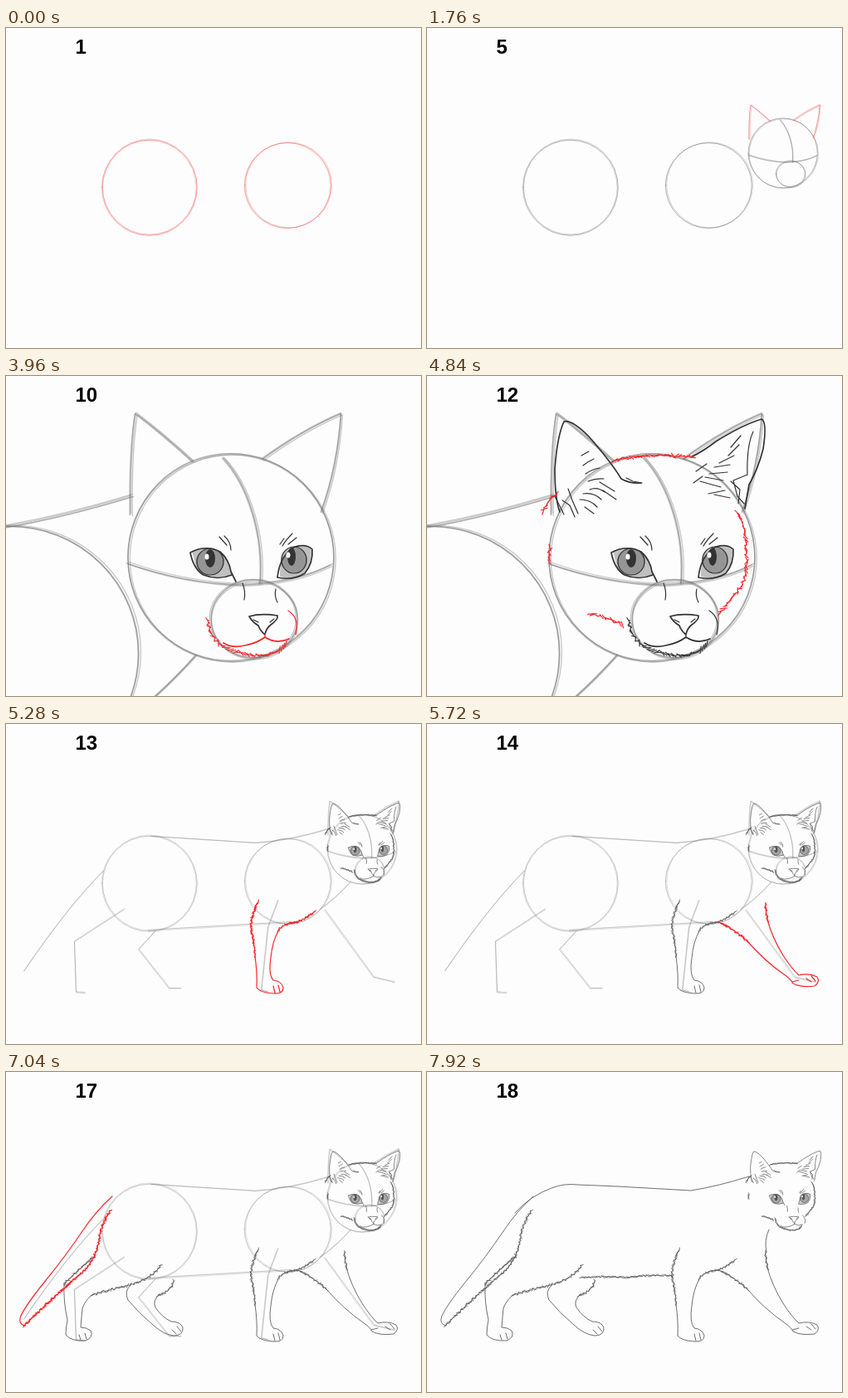
Write an HTML page with a canvas that moves like this. It is 500 px wide and 386 px high and loops after 8800 ms.

```html
<!DOCTYPE html>
<html lang="en">
<head>
<meta charset="utf-8">
<title>How to draw a cat</title>
<style>
html, body { margin: 0; width: 100%; height: 100%; overflow: hidden; background: #fdfdfd; }
canvas { display: block; }
</style>
</head>
<body>
<canvas width="500" height="386"></canvas>
<script>
const ctx = document.querySelector('canvas').getContext('2d');
const STEP = 440, LOOP = 8800, LAST = 18, ZOOM = 2.976;
const isZoomed = k => k >= 7 && k <= 11;

const ellipse = (x, y, rx, ry) =>
  `M${x - rx} ${y}a${rx} ${ry} 0 1 1 ${2 * rx} 0a${rx} ${ry} 0 1 1 ${-2 * rx} 0`;

// Each part: step, space (b = body view, h = head close-up), kind, path
const parts = [
  // construction lines
  [0, 'b', 'guide', ellipse(173, 192, 57, 57.5)],
  [0, 'b', 'guide', ellipse(340, 190, 52, 51.5)],
  [1, 'h', 'guide', ellipse(272.5, 219.5, 124, 125)],
  [2, 'h', 'guide', 'M262 98C292 130 312 190 307 250'],
  [2, 'h', 'guide', 'M147 226Q215 250 285 252Q350 250 392 228'],
  [3, 'h', 'guide', ellipse(299, 294, 52, 47)],
  [4, 'h', 'guide', 'M151 167Q150 90 157 45Q190 70 226 103'],
  [4, 'h', 'guide', 'M310 101Q360 65 405 46Q401 110 381 165'],
  [5, 'b', 'guide', 'M143 223L83 262L85 323L96 324'],
  [5, 'b', 'guide', 'M180 250L160 272L197 319L211 319'],
  [5, 'b', 'guide', 'M328 213L316 245L308 321L316 323'],
  [5, 'b', 'guide', 'M384 224L443 305L468 311'],
  [6, 'b', 'guide', 'M175 135L300 143Q340 141 389 126'],
  [6, 'b', 'guide', 'M172 249L345 239'],
  [6, 'b', 'guide', 'M415 191Q398 210 378 224'],
  [6, 'b', 'guide', 'M118 177Q75 220 22 298'],
  // eyes
  [7, 'h', 'tint', 'M224 211Q245 203 262 215Q270 226 272 240Q240 248 230 234Z'],
  [7, 'h', 'tint', 'M330 238Q330 215 348 207Q362 203 368 209Q369 226 359 238Q344 247 330 242Z'],
  [7, 'h', 'tint', ellipse(246, 224, 17, 16)],
  [7, 'h', 'tint', ellipse(347, 222, 16, 16)],
  [7, 'h', 'bold', 'M222 213Q240 203 258 212Q269 222 271 236L277 248M222 213Q226 233 238 240Q255 247 272 240'],
  [7, 'h', 'bold', 'M327 243Q330 216 348 206Q362 202 369 209Q370 226 360 238Q346 247 327 243'],
  [7, 'h', 'ink', ellipse(246, 224, 16, 16)],
  [7, 'h', 'ink', ellipse(347, 222, 15, 16)],
  [7, 'h', 'solid', ellipse(246, 220, 6, 11)],
  [7, 'h', 'solid', ellipse(344, 218, 5, 11)],
  [7, 'h', 'shine', ellipse(242, 218, 2.5, 3.5)],
  [7, 'h', 'shine', ellipse(340, 216, 2.5, 3.5)],
  [7, 'h', 'ink', 'M257 194L266 204M263 193Q271 200 271 210M330 203L335 196M333 205Q337 198 345 190M340 203L350 195'],
  // nose
  [8, 'h', 'bold', 'M293 290Q307 286 327 289Q328 294 319 300Q313 305 312 312Q306 307 304 301Q297 297 293 290'],
  [8, 'h', 'ink', 'M285 250Q289 260 287 270M325 257Q323 265 327 273M298 294l6 3M318 297l5-4'],
  // mouth and muzzle
  [9, 'h', 'bold', 'M262 322Q273 329 288 325Q303 322 312 315Q326 324 341 317'],
  [9, 'h', 'fur', 'M243 295Q246 318 262 326Q284 338 310 337Q330 334 338 322'],
  [9, 'h', 'ink', 'M340 283Q354 292 349 312M312 311V316'],
  // ears
  [10, 'h', 'bold', 'M160 164Q154 148 154 112Q157 72 165 55Q174 52 195 73Q222 104 234 124Q244 130 258 129'],
  [10, 'h', 'ink', 'M154 145l8 16l3 6M170 136l5 14l7 16M163 150l9 6l6 14M240 123l8 4l11 2'],
  [10, 'h', 'ink', 'M186 96l9-5M188 108q6-5 13-8M191 118q9-6 17-7M194 127q10-4 19-3M196 137q9-4 18 3M188 142q13-2 22 7M184 149q13 0 21 9M190 158l11 8M208 128l18 11M212 138l16 11'],
  [10, 'h', 'bold', 'M318 98Q334 90 348 79Q380 59 403 52Q410 55 405 88Q399 112 388 131L383 160'],
  [10, 'h', 'ink', 'M393 67Q385 84 386 119L369 126L374 145L382 154M366 127l11 10l-2 17'],
  [10, 'h', 'ink', 'M378 72l-12 14M376 83l-13 13M370 96l-18 9M365 107l-19 3M362 116l-22 2M357 126l-22-4M354 134l-25-7M359 138l-20 4M365 147l-19-4M337 106l-13 9M332 121l-11 8'],
  // head outline
  [11, 'h', 'fur', 'M226 102Q270 92 321 98'],
  [11, 'h', 'fur', 'M156 142Q145 150 139 166'],
  [11, 'h', 'fur', 'M148 207L147 226'],
  [11, 'h', 'fur', 'M197 287Q218 291 237 301'],
  [11, 'h', 'fur', 'M374 165Q386 185 384 210Q388 235 378 255Q365 270 353 286'],
  // front legs
  [12, 'b', 'fur', 'M304 214Q296 229 295 246Q300 268 300 282'],
  [12, 'b', 'ink', 'M300 280Q303 302 302 318Q306 324 322 325Q334 326 334 318Q332 310 322 309Q316 302 319 282Q321 262 328 250M322 316l2 8M328 315l2 8'],
  [12, 'b', 'fur', 'M328 249Q334 241 350 239Q363 234 372 226'],
  [13, 'b', 'fur', 'M354 240Q372 249 387 263'],
  [13, 'b', 'ink', 'M386 262Q407 286 430 302Q439 308 441 313Q450 318 467 316Q474 311 470 305Q460 300 448 303Q440 296 429 279Q416 258 410 236M457 307l6 4M463 304l5 6M440 311l8-2'],
  [13, 'b', 'fur', 'M408 217Q408 228 411 238'],
  // hind legs
  [14, 'b', 'fur', 'M107 222Q85 240 70 256'],
  [14, 'b', 'ink', 'M70 255Q69 277 74 299Q72 308 72 317Q78 325 96 324Q106 320 102 312Q97 308 90 308Q91 295 92 285Q96 274 105 268M88 317l2 6M95 315l2 7'],
  [14, 'b', 'fur', 'M104 269Q123 263 145 258Q177 250 187 232'],
  [15, 'b', 'ink', 'M150 257Q142 265 147 275Q160 291 177 305Q190 317 202 318Q214 318 213 308Q210 301 199 301Q188 296 180 284Q176 276 185 268M200 311l5 5M206 307l5 6'],
  [15, 'b', 'fur', 'M183 270Q201 263 202 251'],
  // tail
  [16, 'b', 'ink', 'M128 150Q108 168 92 192Q72 222 45 255Q24 281 18 294Q14 304 23 306'],
  [16, 'b', 'fur', 'M22 306Q32 296 50 279Q74 257 95 239Q111 221 113 196Q117 180 126 167'],
  // body
  [17, 'b', 'ink', 'M106 170Q125 149 150 140Q165 134 182 136L230 138L318 143Q350 138 388 126'],
  [17, 'b', 'fur', 'M186 248Q215 246 240 248Q270 244 296 246'],
  [17, 'b', 'ink', 'M412 190Q406 203 409 217'],
];

function seeded(n) {
  return () => {
    n = (n * 16807 + 11) % 2147483647;
    return n / 2147483647 - 0.5;
  };
}

// Short overlapping hairs that follow a path
function furPath(d, unit, rnd) {
  const line = document.createElementNS('http://www.w3.org/2000/svg', 'path');
  line.setAttribute('d', d);
  const out = new Path2D(), len = line.getTotalLength();
  for (let s = 0; s < len; s += 2 * unit) {
    const a = line.getPointAtLength(s), b = line.getPointAtLength(s + 1);
    const c = line.getPointAtLength(s - 1);
    const angle = Math.atan2(b.y - c.y, b.x - c.x) + rnd() * 1.7;
    const r = unit * (2 + rnd());
    const dx = Math.cos(angle) * r, dy = Math.sin(angle) * r;
    out.moveTo(a.x - dx, a.y - dy);
    out.lineTo(a.x + dx, a.y + dy);
  }
  return out;
}

const shapes = parts.map(([step, space, kind, d], i) => ({
  step, space, kind,
  path: kind === 'fur' ? furPath(d, space === 'h' ? 1.7 : 1, seeded(i * 977 + 41)) : new Path2D(d),
}));

function setView(space, zoomed) {
  if (zoomed && space === 'b') ctx.setTransform(ZOOM, 0, 0, ZOOM, 158 - 391 * ZOOM, 46 - 93 * ZOOM);
  else if (!zoomed && space === 'h') ctx.setTransform(1 / ZOOM, 0, 0, 1 / ZOOM, 391 - 158 / ZOOM, 93 - 46 / ZOOM);
  else ctx.setTransform(1, 0, 0, 1, 0, 0);
  return ctx.getTransform().a;
}

// Pencil look: a few faint passes, slightly shifted
function sketch(path, scale, zoomed, color, rnd) {
  const spread = (zoomed ? 3.6 : 1.6) / scale;
  ctx.strokeStyle = color;
  ctx.lineWidth = (zoomed ? 1.3 : 0.8) / scale;
  for (let n = zoomed ? 4 : 3; n--;) {
    ctx.save();
    ctx.translate(rnd() * spread, rnd() * spread);
    ctx.stroke(path);
    ctx.restore();
  }
}

function drawShape({ step, space, kind, path }, i, k) {
  const zoomed = isZoomed(k), active = step === k;
  const scale = setView(space, zoomed);
  if (kind === 'guide') {
    const color = active ? 'rgba(240,90,90,.45)' : `rgba(110,110,110,${k < 12 ? 0.38 : 0.28})`;
    return sketch(path, scale, zoomed, color, seeded(i * 613 + 7));
  }
  const color = active ? (step === 7 ? '#d8202a' : '#f5282c') : zoomed ? '#333' : '#555';
  ctx.fillStyle = kind === 'shine' ? '#fff' : color;
  ctx.strokeStyle = color;
  if (kind === 'tint') {
    ctx.globalAlpha = 0.3;
    ctx.fill(path);
    ctx.globalAlpha = 1;
  } else if (kind === 'solid' || kind === 'shine') {
    ctx.fill(path);
  } else {
    const width = zoomed ? (kind === 'bold' ? 1.7 : 1.2) : space === 'h' ? 0.7 : active ? 1.2 : 0.85;
    ctx.lineWidth = width / scale;
    ctx.stroke(path);
  }
}

function draw(k) {
  ctx.setTransform(1, 0, 0, 1, 0, 0);
  ctx.fillStyle = '#fdfdfd';
  ctx.fillRect(0, 0, 500, 386);
  ctx.lineCap = ctx.lineJoin = 'round';
  shapes.forEach((s, i) => {
    if (s.step <= k && !(k === LAST && s.kind === 'guide')) drawShape(s, i, k);
  });
  ctx.setTransform(1, 0, 0, 1, 0, 0);
  ctx.fillStyle = '#000';
  ctx.font = 'bold 24px "Liberation Sans", Arial, sans-serif';
  ctx.fillText(Math.min(k + 1, LAST), 83.5, 31);
}

let shown = -1;
function tick() {
  const k = Math.min(LAST, Math.floor(performance.now() % LOOP / STEP));
  if (k !== shown) draw(shown = k);
  requestAnimationFrame(tick);
}
tick();
</script>
</body>
</html>
```
